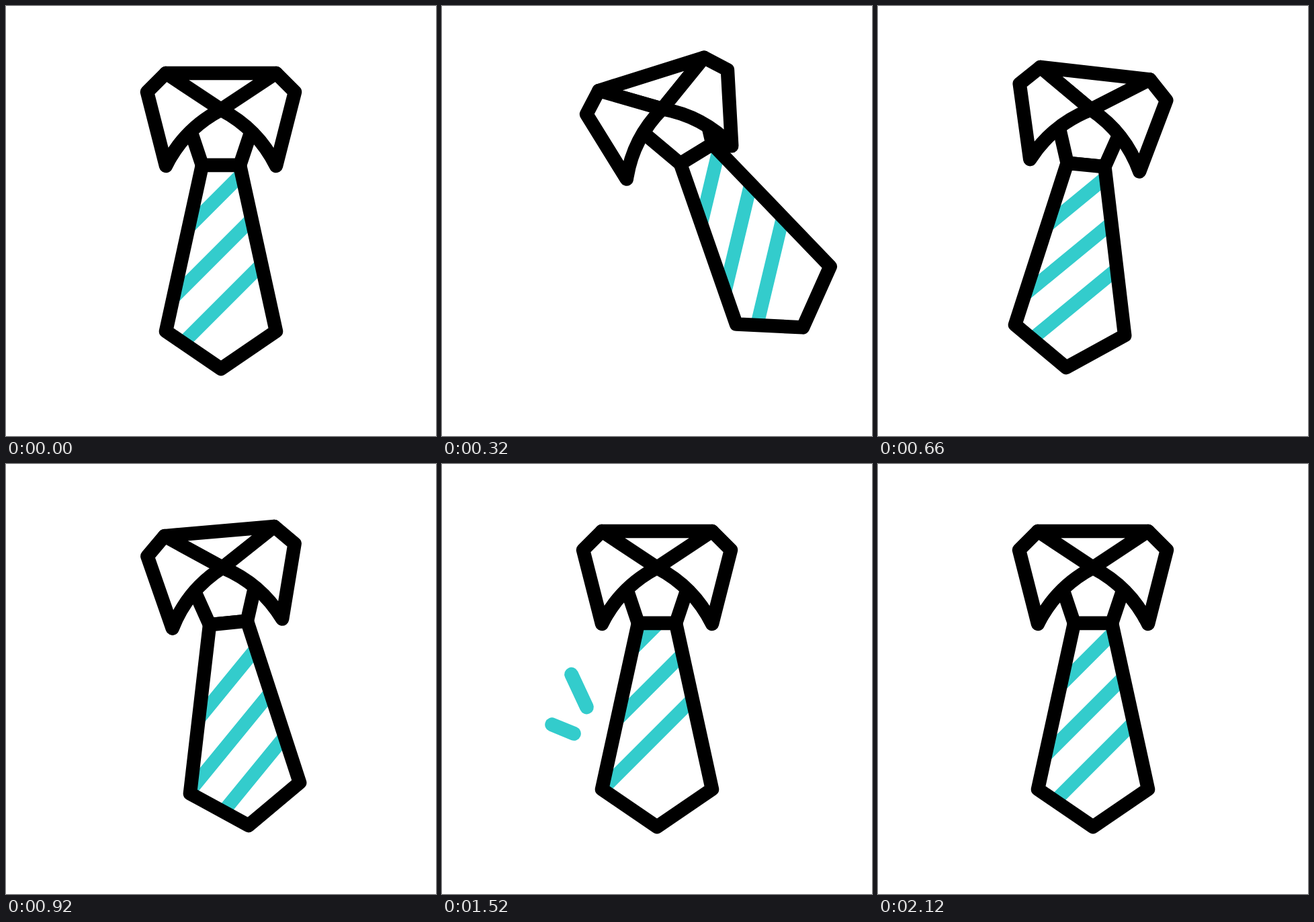
Recreate the animation shown at these times as an HTML page. Size 640 by 640 pixels, loop 2400 ms.

```html
<!DOCTYPE html>
<html lang="en">
<head>
<meta charset="utf-8">
<title>Swinging tie</title>
<style>
html, body { margin: 0; width: 100%; height: 100%; overflow: hidden; background: #fff; }
svg { display: block; width: 100vw; height: 100vh; }
.ink { fill: #fff; stroke: #000; stroke-width: 20.5; stroke-linejoin: round; stroke-linecap: round; }
.line { fill: none; }
.teal { fill: none; stroke: #33cccc; stroke-width: 20.2; }
#marks { stroke-width: 21; stroke-linecap: round; }
</style>
</head>
<body>
<svg viewBox="0 0 640 640">
  <clipPath id="body"><path d="M292 237L238 484L320 540L402 484L348 237Z"/></clipPath>
  <g id="marks" class="teal"><path/><path/></g>
  <g id="shirt">
    <g id="tie">
      <path class="ink" d="M268 165L292 237H348L372 165"/>
      <path fill="#fff" d="M292 237L238 484L320 540L402 484L348 237Z"/>
      <g clip-path="url(#body)"><path id="stripes" class="teal"/></g>
      <path class="ink line" d="M292 237L238 484L320 540L402 484L348 237Z"/>
    </g>
    <path class="ink" d="M238 100H402L320 154.3Z"/>
    <path class="ink" d="M402 100L430 128L402 238Q375 183 320 154.3Z"/>
    <path class="ink" d="M238 100L210 128L238 238Q265 183 320 154.3Z"/>
  </g>
</svg>
<script>
const LOOP = 2400, TRAVEL = 444, LAG = 61;
const $ = id => document.getElementById(id);

// Damped swing: [time, degrees]
const SWING = [[10, 0], [410, -20], [730, 10], [930, -5], [1130, 2], [1330, 0]];
// Spark lines: [x, y, dx, dy] from the tie outwards
const SPARKS = [[229.5, 392, -58, -124], [216.5, 409.5, -83, -34]];
// Stripe centres as x + y: three at rest, one trailing, three that scroll in
const REST = [601, 683, 765];
const STRIPES = [...REST, 483, ...REST.map(c => c - TRAVEL)];

const smooth = u => u * u * (3 - 2 * u);
const progress = (t, from, to) => Math.min(1, Math.max(0, (t - from) / (to - from)));
const ease = (t, from, to) => smooth(progress(t, from, to));

// Like cubic-bezier(.7, 0, .3, 1)
function strongEase(t, from, to) {
  const x = progress(t, from, to);
  let low = 0, high = 1;
  for (let i = 0; i < 24; i++) {
    const s = (low + high) / 2, r = 1 - s;
    if (2.1 * r * r * s + 0.9 * r * s * s + s * s * s < x) low = s;
    else high = s;
  }
  return x === 0 || x === 1 ? x : smooth(low);
}

const swing = t => SWING.slice(1).reduce((angle, [end, value], i) => {
  const [start, before] = SWING[i];
  return angle + (value - before) * ease(t, start, end);
}, 0);

$('stripes').setAttribute('d', STRIPES.map(c => `M${c - 600} 600L${c + 500} -500`).join(''));

function draw(t) {
  $('shirt').setAttribute('transform', `rotate(${swing(t)} 320 128)`);
  $('tie').setAttribute('transform', `rotate(${1.03 * swing(t - LAG)} 320 121)`);
  $('stripes').setAttribute('transform', `translate(0 ${TRAVEL * strongEase(t, 534, 1934)})`);

  const tip = ease(t, 1240, 1715), tail = ease(t, 1240, 2115);
  $('marks').style.display = tip - tail > 0.001 ? '' : 'none';
  SPARKS.forEach(([x, y, dx, dy], i) => {
    const at = k => `${x + dx * k} ${y + dy * k}`;
    $('marks').children[i].setAttribute('d', `M${at(tail)}L${at(tip)}`);
  });
}

const start = performance.now();
function tick() {
  draw((performance.now() - start) % LOOP);
  requestAnimationFrame(tick);
}
tick();
</script>
</body>
</html>
```
